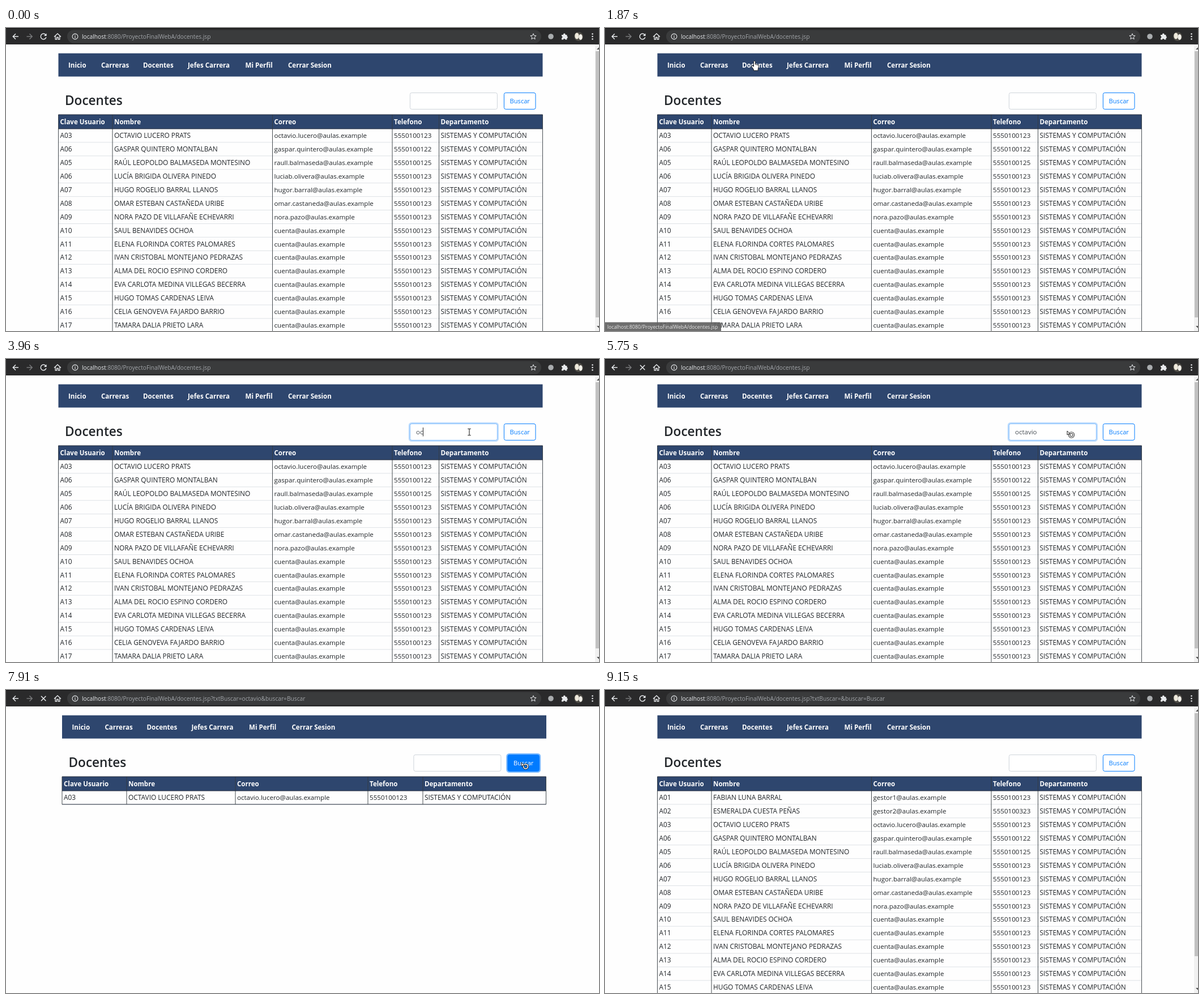
An HTML page for the animation above (9620 ms loop, 1047 by 535 pixels).

```html
<!DOCTYPE html>
<html lang="es">
<head>
<meta charset="utf-8">
<title>Docentes</title>
<style>
  html, body { margin: 0; width: 100%; height: 100%; overflow: hidden; background: #fefefe; }
  svg { display: block; width: 100%; height: 100%; font-family: "Open Sans", "Noto Sans", sans-serif; }
  text { white-space: pre; }
  .bold { font-weight: 700; font-size: 11.55px; fill: #fff; }
  .caps { font-size: 11.9px; fill: #212529; }
  .low { font-size: 11.6px; fill: #212529; }
  .icon { fill: none; stroke: #e8eaed; stroke-width: 1.5; }
</style>
</head>
<body>
<svg id="stage" viewBox="0 0 1047 535"></svg>
<script>
const LOOP = 9620;
const WORD = 'octavio';
const KEY_TIMES = [3730, 3960, 4190, 4420, 4670, 4900, 5140];
const RESULT_AT = 5820, FULL_AT = 8000;
const BUSY = [[1300, 1550], [5670, 5820], [7760, 8070]];
const NAVY = '#2e466e';
const PHONE = '5550100123';

// key, name, mail user, phone
const people = [
  ['A01', 'FABIAN LUNA BARRAL', 'gestor1'],
  ['A02', 'ESMERALDA CUESTA PEÑAS', 'gestor2', '5550100323'],
  ['A03', 'OCTAVIO LUCERO PRATS', 'octavio.lucero'],
  ['A06', 'GASPAR QUINTERO MONTALBAN', 'gaspar.quintero', '5550100122'],
  ['A05', 'RAÚL LEOPOLDO BALMASEDA MONTESINO', 'raull.balmaseda', '5550100125'],
  ['A06', 'LUCÍA BRIGIDA OLIVERA PINEDO', 'luciab.olivera'],
  ['A07', 'HUGO ROGELIO BARRAL LLANOS', 'hugor.barral'],
  ['A08', 'OMAR ESTEBAN CASTAÑEDA URIBE', 'omar.castaneda'],
  ['A09', 'NORA PAZO DE VILLAFAÑE ECHEVARRI', 'nora.pazo'],
  ['A10', 'SAUL BENAVIDES OCHOA'],
  ['A11', 'ELENA FLORINDA CORTES PALOMARES'],
  ['A12', 'IVAN CRISTOBAL MONTEJANO PEDRAZAS'],
  ['A13', 'ALMA DEL ROCIO ESPINO CORDERO'],
  ['A14', 'EVA CARLOTA MEDINA VILLEGAS BECERRA'],
  ['A15', 'HUGO TOMAS CARDENAS LEIVA'],
  ['A16', 'CELIA GENOVEVA FAJARDO BARRIO'],
  ['A17', 'TAMARA DALIA PRIETO LARA']
];

const text = (x, y, value, cls, extra = '') => `<text x="${x}" y="${y}" class="${cls}" ${extra}>${value}</text>`;
const rect = (x, y, w, h, extra) => `<rect x="${x}" y="${y}" width="${w}" height="${h}" ${extra}/>`;
const path = (d, extra = 'class="icon"') => `<path d="${d}" ${extra}/>`;
const circle = (x, y, r, extra) => `<circle cx="${x}" cy="${y}" r="${r}" ${extra}/>`;

function table(id, columns, rows) {
  const [left, right] = [columns[0], columns[5]];
  const top = 153, first = 178, pitch = 23.92;
  const bottom = first + rows.length * pitch;
  const titles = ['Clave Usuario', 'Nombre', 'Correo', 'Telefono', 'Departamento'];
  const cellClass = ['caps', 'caps', 'low', 'low', 'caps'];
  let out = rect(left, top, right - left, first - top, `fill="${NAVY}"`);
  out += titles.map((title, i) => text(columns[i] + 3, 169.5, title, 'bold')).join('');
  rows.forEach(([key, name, user = 'cuenta', phone = PHONE], r) => {
    const y = first + r * pitch;
    const cells = [key, name, user + '@aulas.example', phone, 'SISTEMAS Y COMPUTACIÓN'];
    out += cells.map((cell, i) => text(columns[i] + 3, (y + 16.1).toFixed(1), cell, cellClass[i])).join('');
    out += path(`M${left} ${y + pitch}H${right}`, 'stroke="#dee2e6"');
  });
  out += path(columns.map(x => `M${x} ${top}V${bottom}`).join(''), 'stroke="#343a40" stroke-width=".9"');
  out += path(`M${left} ${top}H${right}M${left} ${first}H${right}M${left} ${bottom}H${right}`,
    'stroke="#222b3a" stroke-width="1"');
  return `<g id="${id}">${out}</g>`;
}

function toolbar() {
  return rect(0, 0, 1047, 29, 'fill="#2a2a2b"') + rect(0, 0, 1047, 1, 'fill="#111"') +
    rect(108, 3.5, 837, 23, 'rx="11.5" fill="#3a3b3c"') +
    path('M22 15H12.5M17 10.3L12.3 15L17 19.7') +
    path('M36.5 15H46M41.5 10.3L46.2 15L41.5 19.7', 'class="icon" style="stroke:#77787a"') +
    `<g id="reload">${path('M70.2 12.2A4.9 4.9 0 1 0 70.9 16.3')}${path('M71.6 9.4V14H67z', 'fill="#e8eaed"')}</g>` +
    path('M62 10.8L70.4 19.2M70.4 10.8L62 19.2', 'class="icon" id="stop"') +
    path('M85 15.5L91 10L97 15.5M87.2 14V20H89.7V16.5H92.3V20H94.8V14', 'class="icon" style="stroke-width:1.3"') +
    circle(122, 15, 4.9, 'class="icon" style="stroke-width:1.1"') +
    path('M122 14.3V17.8M122 12V13.2', 'class="icon" style="stroke-width:1.2"') +
    '<text x="134" y="18.7" font-size="10.2" fill="#e8eaed">localhost<tspan fill="#a2a5a9">:8080/ProyectoFinalWebA/docentes.jsp<tspan id="query"></tspan></tspan></text>' +
    path('M931 9.8L932.4 13.3L936.1 13.6L933.3 16L934.2 19.7L931 17.7L927.8 19.7L928.7 16L925.9 13.6L929.6 13.3z',
      'class="icon" style="stroke-width:1"') +
    circle(962, 15, 4.8, 'fill="#a9acae"') +
    path('M981 12H984V11.2A1.8 1.8 0 0 1 987.6 11.2V12H990.4V14.5A1.8 1.8 0 0 1 990.4 18V20.4H987.5A1.8 1.8 0 0 0 984 20.4H981V17.8A1.8 1.8 0 0 0 981 14.3z',
      'fill="#e8eaed"') +
    circle(1011, 15, 8, 'fill="#4c4a45"') +
    '<ellipse cx="1008" cy="14" rx="3.7" ry="5.5" fill="#eee9dc"/><ellipse cx="1014.5" cy="16" rx="3.2" ry="5" fill="#f3f1ea"/>' +
    [10.5, 15, 19.5].map(y => circle(1035.5, y, 1.3, 'fill="#e8eaed"')).join('');
}

function pageHead() {
  const links = { Inicio: 110, Carreras: 168, Docentes: 242, 'Jefes Carrera': 321, 'Mi Perfil': 422.5, 'Cerrar Sesion': 498 };
  const field = 'x="713.4" y="114.4" width="154" height="29" rx="3"';
  const button = 'x="879.4" y="114.4" width="55.6" height="29" rx="3"';
  return '<g id="head">' + rect(92.5, 44.7, 855, 41, `fill="${NAVY}"`) +
    Object.entries(links).map(([label, x]) => text(x, 70, label, 'bold')).join('') +
    text(104, 135.6, 'Docentes', '', 'font-size="22.6" font-weight="600" fill="#212529"') +
    `<rect ${field} fill="#fff" stroke="#ced4da"/>` +
    `<g id="focus"><rect ${field} fill="none" stroke="#007bff" stroke-opacity=".25" stroke-width="5.4"/>` +
    `<rect ${field} fill="#fff" stroke="#80bdff"/></g>` +
    text(724, 133, '', '', 'id="typed" font-size="11.5" fill="#495057"') +
    rect(0, 121, 1, 15.5, 'id="caret" fill="#222"') +
    `<rect ${button} id="ring" fill="none" stroke="#007bff" stroke-opacity=".5" stroke-width="5.4"/>` +
    `<rect ${button} fill="#fff"/><rect ${button} id="button" fill="#007bff" stroke="#007bff"/>` +
    text(889.6, 133, 'Buscar', '', 'id="label" font-size="11.1"') + '</g>';
}

function cursors() {
  const solid = 'fill="#fff" stroke="#111" stroke-width=".9" stroke-linejoin="round"';
  const shapes = {
    arrow: path('M0 0V13L3 10.2L5.1 15L7.2 14.1L5.1 9.4H9.2z', solid),
    hand: path('M-1.5 1.2Q0-1.2 1.5 1.2V6L6 7.2Q7.8 7.8 7.4 10L6.3 14.5V17H-1.5V15L-5 10.2Q-5.6 8-3.6 8.3L-1.5 10z', solid),
    beam: path('M-2.8-5.8H-.7L0-5.2L.7-5.8H2.8M0-5.2V5.2M-2.8 5.8H-.7L0 5.2L.7 5.8H2.8', 'fill="none" stroke="#222" stroke-width="1.1"'),
    busy: circle(5.5, 5, 3.9, 'fill="none" stroke="#111" stroke-width="3.4"') +
      circle(5.5, 5, 3.9, 'fill="none" stroke="#eee" stroke-width="1.8"') +
      path('M-2-2V5L0 3.6L3 3.2z', solid)
  };
  return '<g id="cursor">' + Object.entries(shapes).map(([id, art]) => `<g id="${id}">${art}</g>`).join('') + '</g>';
}

const wide = [92.5, 188, 470.5, 682, 764.5, 947.5];
const narrow = [99, 213, 405, 639, 736, 953.5];
const stage = document.getElementById('stage');
stage.innerHTML = rect(0, 0, 1047, 535, 'fill="#fefefe"') +
  table('list', wide, people.slice(2)) + table('result', narrow, [people[2]]) +
  table('full', wide, people.slice(0, 15)) + pageHead() +
  '<g id="scroll">' + rect(1040, 29, 7, 506, 'fill="#f1f1f1"') + rect(1041, 41, 6, 470, 'id="thumb" fill="#c1c1c1"') +
  path('M1043 38L1047 34V38zM1043 526H1047V530z', 'fill="#505050"') + '</g>' +
  '<g id="status">' + path('M0 519.5H202Q205 519.5 205 522.5V535H0z', 'fill="#626262" fill-opacity=".92"') +
  text(4, 531, 'localhost:8080/ProyectoFinalWebA/docentes.jsp', '', 'font-size="8.75" fill="#e6e6e6"') + '</g>' +
  toolbar() + cursors();

const el = id => document.getElementById(id);
const show = (id, on) => el(id).style.display = on ? '' : 'none';
const within = (t, a, b) => t >= a && t < b;
const ramp = (t, start, length) => Math.min(1, Math.max(0, (t - start) / length));

// time, x, y of the pointer's hot spot
const route = [
  [70, 990, 530], [400, 760, 250], [650, 480, 90], [810, 300, 30], [910, 240, 40], [1010, 256, 54],
  [1160, 263, 58], [1870, 263, 58], [2210, 560, 96], [2570, 818, 129], [6980, 818, 129],
  [7060, 853, 128], [7530, 912, 130], [8300, 912, 130], [9150, 1036, 535]
];

function pointerAt(t) {
  const i = Math.max(1, route.findIndex(stop => stop[0] > t));
  const [a, b] = [route[i - 1], route[i]];
  const k = ramp(t, a[0], b[0] - a[0]);
  return [a[1] + (b[1] - a[1]) * k, a[2] + (b[2] - a[2]) * k];
}

function pointerKind(t, busy) {
  if (busy) return 'busy';
  if (within(t, 1000, 1950) || within(t, 7380, 8400)) return 'hand';
  return within(t, 2500, 7380) ? 'beam' : 'arrow';
}

function draw(t) {
  const scene = t < RESULT_AT ? 'list' : t < FULL_AT ? 'result' : 'full';
  const busy = BUSY.some(([a, b]) => within(t, a, b));
  for (const id of ['list', 'result', 'full']) show(id, id === scene);
  show('scroll', scene !== 'result');
  el('thumb').setAttribute('height', scene === 'full' ? 429 : 470);
  el('head').setAttribute('transform', `translate(${scene === 'result' ? 6.5 : 0} 0)`);
  el('query').textContent = { list: '', result: `?txtBuscar=${WORD}&buscar=Buscar`, full: '?txtBuscar=&buscar=Buscar' }[scene];
  show('reload', !busy);
  show('stop', busy);
  el('status').style.opacity = ramp(t, 1290, 100) * (1 - ramp(t, 1950, 150));

  const focused = scene === 'list' ? ramp(t, 2720, 230) : 0;
  const count = scene === 'list' ? KEY_TIMES.filter(key => key <= t).length : 0;
  const lastKey = count ? KEY_TIMES[count - 1] : 2880;
  el('focus').style.opacity = focused;
  el('typed').textContent = WORD.slice(0, count);
  show('caret', scene === 'list' && t >= 2880 && Math.floor((t - lastKey) / 530) % 2 === 0);
  el('caret').setAttribute('x', 723.5 + (count ? el('typed').getComputedTextLength() : 0));

  const hover = scene === 'result' ? ramp(t, 7380, 150) : 0;
  el('button').setAttribute('fill-opacity', hover);
  el('label').setAttribute('fill', `rgb(${255 * hover},${123 + 132 * hover},255)`);
  el('ring').style.opacity = scene === 'result' ? ramp(t, 7740, 100) : 0;

  const kind = pointerKind(t, busy);
  for (const id of ['arrow', 'hand', 'beam', 'busy']) show(id, id === kind);
  show('cursor', within(t, 70, 9150));
  if (within(t, 70, 9150)) el('cursor').setAttribute('transform', `translate(${pointerAt(t)})`);
}

function tick() {
  draw(performance.now() % LOOP);
  requestAnimationFrame(tick);
}
tick();
</script>
</body>
</html>
```
